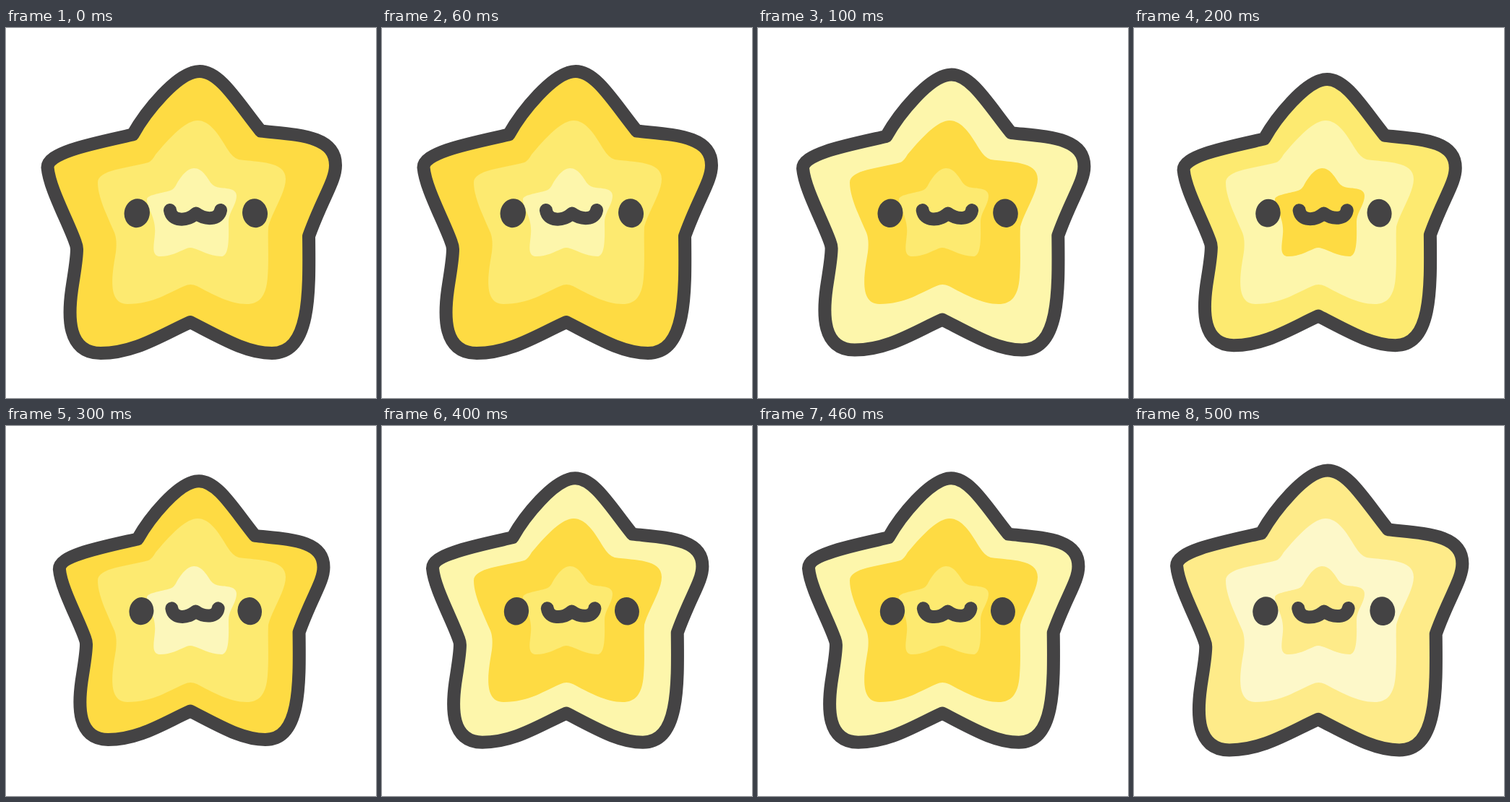
An HTML page for the animation above (600 ms loop, 512 by 512 pixels).

```html
<!DOCTYPE html>
<html lang="en">
<head>
<meta charset="utf-8">
<title>Pulsing star</title>
<style>
  html, body { margin: 0; width: 100%; height: 100%; overflow: hidden; background: #fff; }
  svg { display: block; width: 100%; height: 100%; }
  .ink { stroke: #444344; stroke-width: 18; stroke-linejoin: round; stroke-linecap: round; vector-effect: non-scaling-stroke; }
  .eye { fill: #444344; }
</style>
</head>
<body>
<svg viewBox="0 0 512 512">
  <g class="pulse">
    <path class="ink layer" d="M268 60C296 60 320 102 352.5 142.5C402 148 456 148 456 190C456 212 438 235 419 288
      C420 370 421 450 368 450C333 450 300 430 255 407C215 425 178 450 131 450C84 450 86 398 91 362
      C95 335 98 320 98 306Q98 302 96 297C86 268 60 222 57.5 193C57 172 120 160 175.5 147.5C192 118 237 60 268 60Z"/>
  </g>
  <path class="layer" d="M265 128C282 128 294 147 306 167Q314 180 322 182C350 186 387 184 387 209
    C387 228 368 255 363 275C362 295 364 320 362 345C360 372 350 382 333 382C310 382 285 368 264 357Q255 353 247 357
    C225 366 204 382 168 382C138 382 148 335 152 310Q154 293 150 283C140 260 127 234 127 214
    C127 196 168 194 197 186Q202 184 207 175C220 160 246 128 265 128Z"/>
  <path class="layer" d="M260 194C272 194 278 207 284 215Q288 220 296 221C308 222 319 223 319 232
    C319 245 308 255 308 268C308 285 310 316 298 316C282 316 268 307 260 305Q255 303 250 305
    C238 310 228 316 214 316C200 316 205 300 206 285C208 262 195 250 195 237
    C195 231 214 229 227 225Q233 223 236 216C242 205 251 194 260 194Z"/>
  <g class="pulse">
    <ellipse class="ink eye" cx="181.3" cy="256.2" rx="8.6" ry="11" transform="rotate(10 181.3 256)"/>
    <ellipse class="ink eye" cx="344.5" cy="256.2" rx="8.4" ry="11" transform="rotate(-10 344.5 256)"/>
    <path class="ink" fill="none" d="M227 252C229 268 250 268 263 256.5C276 266 295 266 297 252"/>
  </g>
</svg>
<script>
  const STEP = 100;
  const gold = '#fedb43', lemon = '#fdea70', cream = '#fdf6ab';
  // scale, then fills from the outer layer to the inner one
  const poses = [
    [1, gold, lemon, cream],
    [.977, cream, gold, lemon],
    [.944, lemon, cream, gold],
    [.9175, gold, lemon, '#fcf7bb'],
    [.937, cream, gold, lemon],
    [.992, '#feeb89', '#fdf8c9', '#feeb89']
  ];
  const pulses = document.querySelectorAll('.pulse');
  const layers = document.querySelectorAll('.layer');
  const start = performance.now();

  function draw() {
    const step = Math.floor((performance.now() - start) / STEP) % poses.length;
    const [scale, ...fills] = poses[step];
    pulses.forEach(g => g.setAttribute('transform', `translate(256 256) scale(${scale}) translate(-256 -256)`));
    layers.forEach((path, i) => path.setAttribute('fill', fills[i]));
    requestAnimationFrame(draw);
  }
  draw();
</script>
</body>
</html>
```
